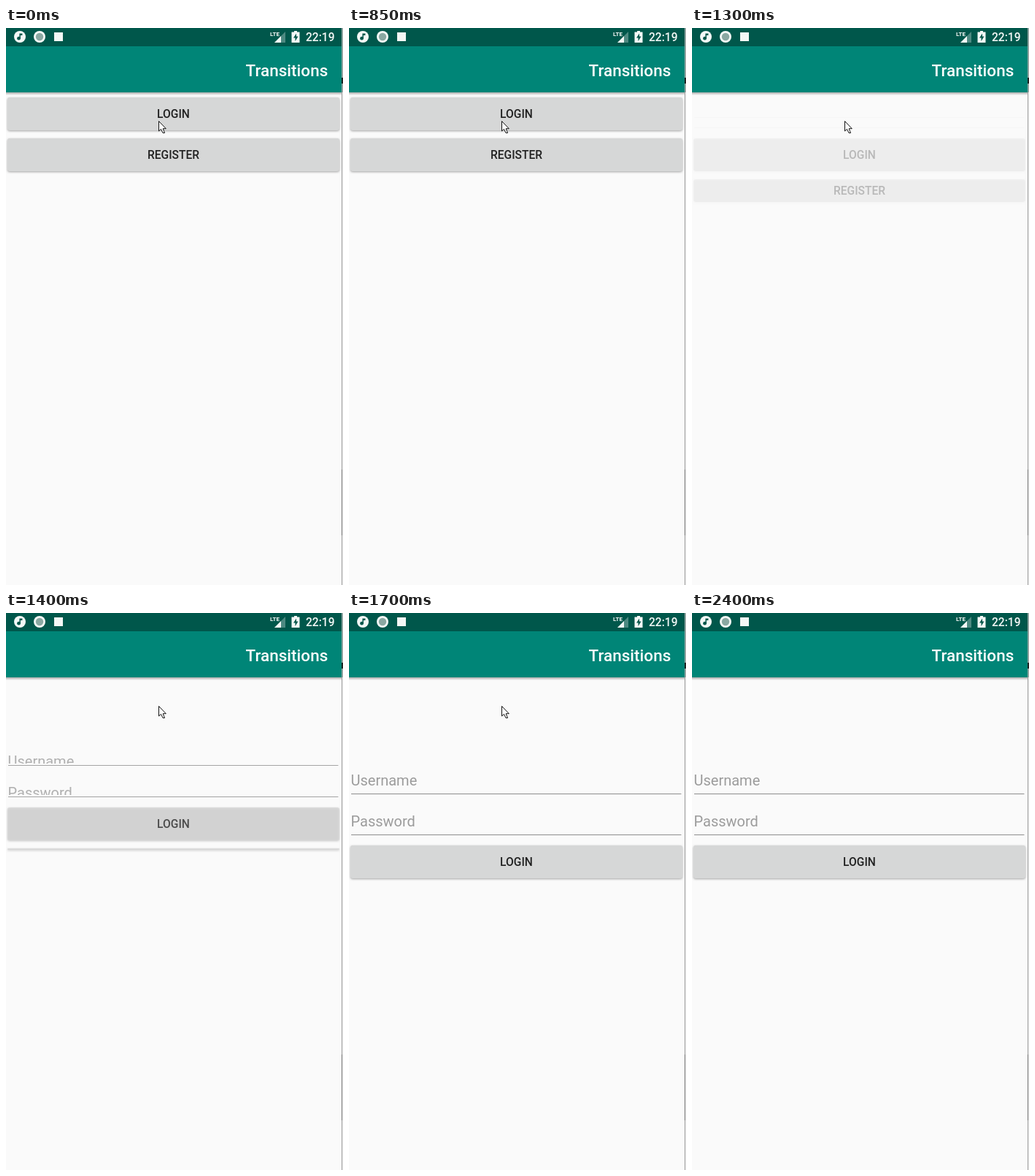
An HTML page with a canvas that plays this animation: 462x762 px, repeating every 3 s.

```html
<!DOCTYPE html>
<html lang="en">
<head>
<meta charset="utf-8">
<title>Transitions</title>
<style>
  html, body { margin: 0; width: 100%; height: 100%; overflow: hidden; background: #fafafa; }
  canvas { display: block; }
</style>
</head>
<body>
<canvas id="stage" width="462" height="762"></canvas>
<script>
const ctx = document.getElementById('stage').getContext('2d');
const LOOP = 3000, STEP = 50;
const MOVE_START = 1200, MOVE_TIME = 296;
const SLOT = 56;
const DARK = '#00574b', PALE = '#f4f8f6';

const clamp = v => Math.max(0, Math.min(1, v));
const ease = t => 0.5 - 0.5 * Math.cos(Math.PI * clamp(t));

function rect(x, y, w, h, fill) {
  ctx.fillStyle = fill;
  ctx.fillRect(x, y, w, h);
}

function circle(x, y, r, fill) {
  ctx.fillStyle = fill;
  ctx.beginPath();
  ctx.arc(x, y, r, 0, 7);
  ctx.fill();
}

function shape(path, fill, stroke) {
  const p = new Path2D(path);
  ctx.fillStyle = fill;
  ctx.fill(p);
  if (stroke) {
    ctx.strokeStyle = stroke;
    ctx.lineWidth = 1;
    ctx.stroke(p);
  }
}

function clipRect(x, y, w, h) {
  ctx.beginPath();
  ctx.rect(x, y, w, Math.max(0, h));
  ctx.clip();
}

function text(str, x, y, size, fill, weight = 500, align = 'left') {
  ctx.font = `${weight} ${size}px Roboto, sans-serif`;
  ctx.textAlign = align;
  ctx.fillStyle = fill;
  ctx.fillText(str, x, y);
}

function statusBar() {
  rect(0, 0, 460, 25, DARK);
  circle(19, 12, 8, PALE);
  circle(17.5, 14.2, 2.4, DARK);
  shape('M18.4 7.5h4v2.4h-2.5v4.3h-1.5z', DARK);
  circle(46, 12, 8, PALE);
  circle(46, 12, 5.2, '#8aa8a2');
  rect(66, 6, 12, 12, PALE);
  text('LTE', 362, 11, 8, PALE, 700);
  shape('M383 5V20H368z', '#4d8981');
  shape('M377 11V20H368z', PALE);
  shape('M395 4h4v1.5h3.5V20h-11V5.5H395z', PALE);
  shape('M398 7.5v4h2.5l-4 6.5v-4.5h-2.5z', DARK);
  text('22:19', 450.5, 18.3, 15.6, PALE, 500, 'right');
}

function toolbar() {
  rect(0, 25, 460, 63, '#008577');
  const shadow = ctx.createLinearGradient(0, 88, 0, 92);
  shadow.addColorStop(0, 'rgba(0,0,0,.32)');
  shadow.addColorStop(1, 'rgba(0,0,0,0)');
  rect(0, 88, 460, 4, shadow);
  text('Transitions', 441.3, 65.5, 22.5, '#fff', 500, 'right');
}

function button(label, y, h, alpha, lift) {
  if (h <= 0) return;
  ctx.save();
  ctx.globalAlpha = alpha;
  ctx.beginPath();
  ctx.roundRect(2, y, 455, h, Math.min(3, h / 2));
  ctx.shadowColor = `rgba(0,0,0,${0.35 * alpha})`;
  ctx.shadowBlur = 3 + 4 * lift;
  ctx.shadowOffsetY = 1 + 1.5 * lift;
  ctx.fillStyle = '#d6d7d7';
  ctx.fill();
  ctx.shadowColor = 'transparent';
  clipRect(2, y + 5, 455, h - 10);
  text(label, 229.5, y + h / 2 + 5.3, 15.6, '#212121', 500, 'center');
  ctx.restore();
}

function field(hint, y, h, alpha) {
  ctx.save();
  ctx.globalAlpha = alpha;
  rect(3, y + h, 452.5, 1, '#8e8e8e');
  clipRect(0, y, 460, h - 2);
  text(hint, 2.5, y + 44.7, 20, '#9c9c9c', 400);
  ctx.restore();
}

function cursorAt(x, y) {
  ctx.save();
  ctx.translate(x, y);
  shape('M0 0V13.5L3 10.8L5.5 16H8L5.7 10.2H9.8z', '#fff', '#111');
  ctx.restore();
}

// The pointer rests on the first button, then glides off towards (x, y).
function leave(time, start, end, x, y) {
  if (time >= end) return;
  const k = ease((time - start) / (end - start));
  cursorAt(209.5 + (x - 209.5) * k, 127.5 + (y - 127.5) * k);
}

function pointer(time) {
  if (time < 850) leave(time, 0, 600, 462, 432);
  else leave(time, 1900, 2400, 444, 676);
}

function rightEdge() {
  rect(460, 0, 2, 88, '#8fa3a0');
  rect(460, 88, 1, 674, '#a0a0a0');
  rect(461, 88, 1, 674, '#ececec');
  rect(460, 68, 2, 8, '#1c2422');
  rect(460, 604, 1, 90, '#787878');
}

function draw(time) {
  const p = ease((time - MOVE_START) / MOVE_TIME);
  const moving = time > MOVE_START;
  const alpha = moving ? p : 1;
  const fieldAlpha = clamp(1.5 * p - 0.35);
  const lift = moving ? 0 : clamp((time - 1000) / 100);
  const top = Math.round(80 + 111 * p);
  const h = Math.round(SLOT * p);
  const loginY = top + 2 * h + 15;

  rect(0, 0, 462, 762, '#fafafa');
  field('Username', top, h, fieldAlpha);
  field('Password', top + h, h, fieldAlpha);
  button('LOGIN', loginY, 45, alpha, lift);
  button('REGISTER', loginY + SLOT, SLOT - h - 11, alpha, 0);
  toolbar();
  statusBar();
  rightEdge();
  pointer(time);
}

function tick() {
  const time = performance.now() % LOOP;
  draw(Math.floor(time / STEP) * STEP);
  requestAnimationFrame(tick);
}
tick();
</script>
</body>
</html>
```
